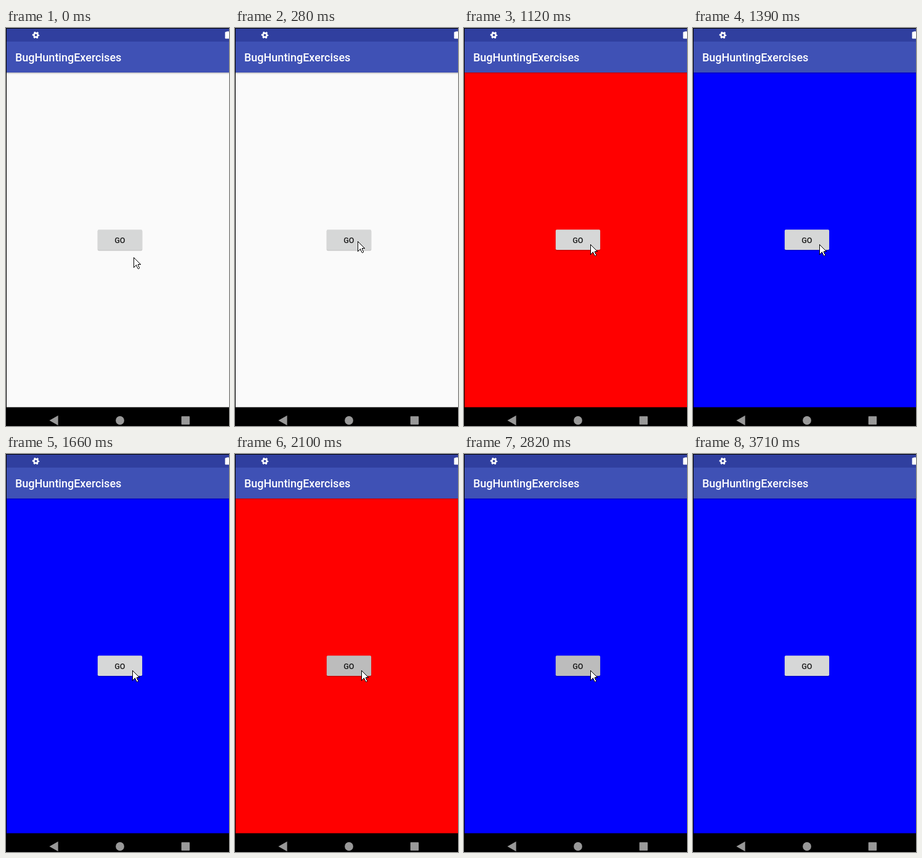
An HTML page that plays this animation: 362x644 px, repeating every 4140 ms.

```html
<!DOCTYPE html>
<html lang="en">
<head>
<meta charset="utf-8">
<title>Button demo</title>
<style>
  html, body { margin: 0; width: 100%; height: 100%; overflow: hidden; background: #000; }
  svg { display: block; }
  text { font-family: Roboto, "Noto Sans", sans-serif; font-weight: 500; }
</style>
</head>
<body>
<svg width="362" height="644" viewBox="0 0 362 644">
  <defs>
    <linearGradient id="fade" x2="0" y2="1">
      <stop stop-opacity=".25"/>
      <stop offset="1" stop-opacity="0"/>
    </linearGradient>
  </defs>

  <rect width="362" height="644"/>
  <rect id="page" x="1" y="72" width="361" height="541.6"/>
  <rect x="1" y="1" width="361" height="21" fill="#303f9f"/>
  <rect x="1" y="22" width="361" height="50" fill="#3f51b5"/>
  <rect x="1" y="72" width="361" height="3" fill="url(#fade)"/>
  <text x="15" y="54" font-size="18" fill="#fff">BugHuntingExercises</text>

  <!-- status icons -->
  <g fill="none" stroke="#fff" transform="translate(48.5 11.5)">
    <circle r="3.2" stroke-width="2.6"/>
    <circle r="4.8" stroke-width="2" stroke-dasharray="2.513" stroke-dashoffset="1.256"/>
  </g>
  <path d="M355.6 7.2q0-.9.9-.9h1.6V5.4h4v11.8h-5.6q-.9 0-.9-.9z" fill="#fff"/>

  <rect x="148.7" y="327" width="72.6" height="33.4" rx="2.2" opacity=".2"/>
  <rect id="button" x="148.8" y="326.2" width="72.3" height="32.8" rx="1.8"/>
  <text x="184.8" y="347.5" font-size="12.6" text-anchor="middle" fill="#000" fill-opacity=".87">GO</text>

  <!-- navigation icons -->
  <g fill="#999">
    <path d="M70.4 635L84.6 627V643z"/>
    <circle cx="185" cy="635" r="6.9"/>
    <rect x="284.7" y="628.3" width="13.5" height="13.5" rx=".8"/>
  </g>

  <path id="cursor" d="M.5 .5V16.5L4.5 12.5 7.3 18.5H8.5L9.5 17.5 7.2 11.5H11.5Z"
        fill="#fff" stroke="#000" shape-rendering="crispEdges"/>
</svg>

<script>
const LOOP = 4140;
const LIGHT = '#fafafa', RED = '#f00', BLUE = '#00f';
const IDLE = '#d6d7d7', FADING = '#c9c9c9', DOWN = '#bcbcbc';

// Each step lists only what changes; the rest carries over.
const steps = [
  { t: 0, page: LIGHT, button: IDLE, at: [207, 371] },
  { t: 130, at: [202, 355] },
  { t: 280, at: [199, 345] },
  { t: 420, page: RED, button: DOWN, at: [199, 350] },
  { t: 550, button: IDLE, at: [207, 371] },
  { t: 700, at: [205, 356] },
  { t: 850, at: [205, 355] },
  { t: 1000, at: [205, 352] },
  { t: 1120, at: [205, 350] },
  { t: 1390, page: BLUE },
  { t: 2100, page: RED, button: DOWN },
  { t: 2220, button: FADING },
  { t: 2340, button: IDLE },
  { t: 2650, button: FADING },
  { t: 2820, page: BLUE, button: DOWN },
  { t: 2940, button: IDLE },
  { t: 3350, at: [211, 376] },
  { t: 3470, at: [246, 492] },
  { t: 3590, at: [286, 616] },
  { t: 3710, at: null }
];

const states = [];
steps.reduce((last, step) => {
  const state = { ...last, ...step };
  states.push(state);
  return state;
}, {});

const el = id => document.getElementById(id);
const page = el('page'), button = el('button'), cursor = el('cursor');

function draw(time) {
  const s = states.filter(state => state.t <= time).pop();
  page.setAttribute('fill', s.page);
  button.setAttribute('fill', s.button);
  cursor.setAttribute('visibility', s.at ? 'visible' : 'hidden');
  if (s.at) cursor.setAttribute('transform', `translate(${s.at})`);
}

const start = performance.now();
function tick() {
  draw((performance.now() - start) % LOOP);
  requestAnimationFrame(tick);
}
tick();
</script>
</body>
</html>
```
